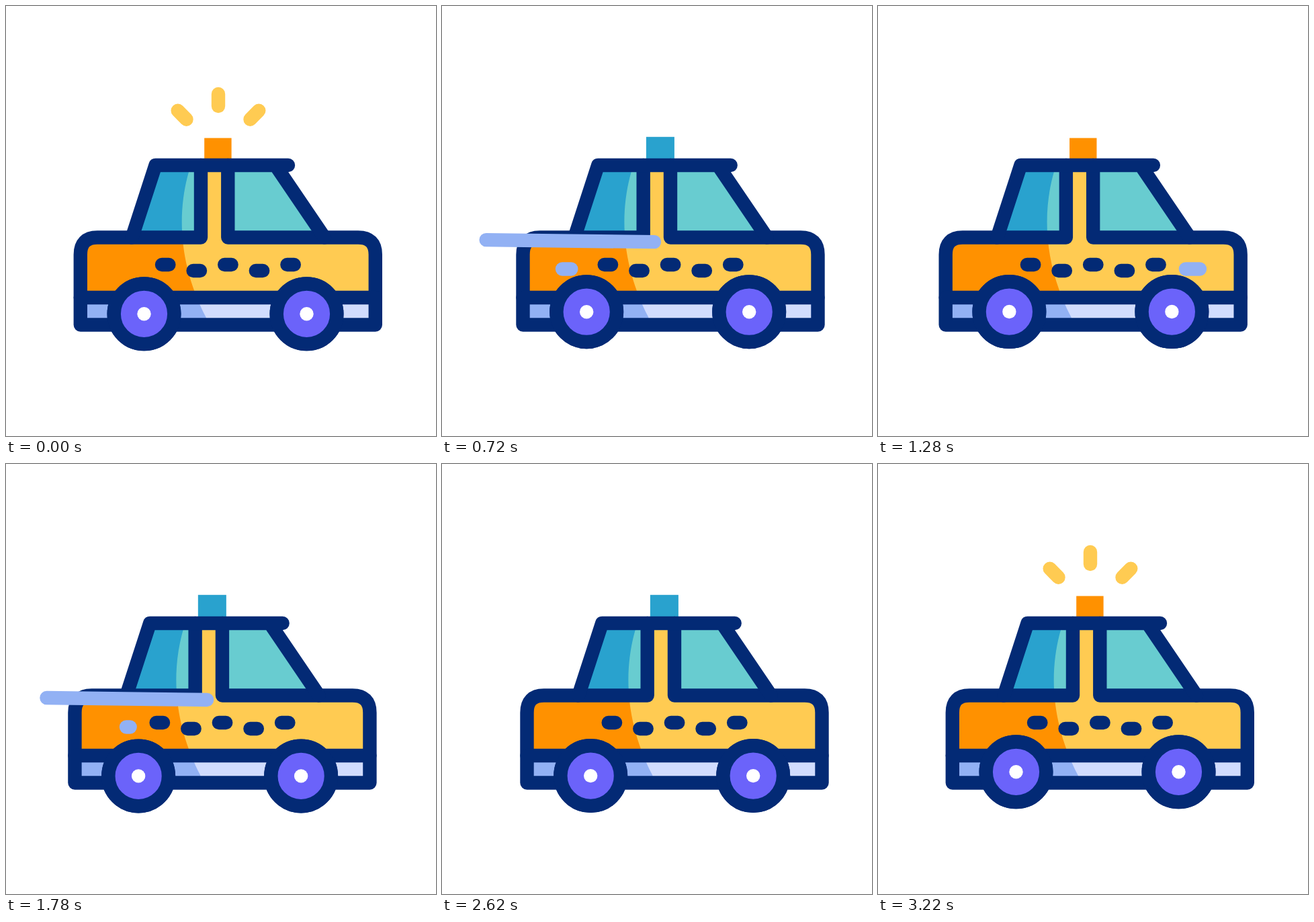
Write an HTML page that moves like this. It is 640 px wide and 640 px high and loops after 3340 ms.

```html
<!DOCTYPE html>
<html>
<head>
<meta charset="utf-8">
<style>
html, body { margin: 0; width: 100%; height: 100%; overflow: hidden; background: #fff; }
svg { display: block; width: 100vmin; height: 100vmin; }
.ink { fill: none; stroke: #032a75; }
.ray { stroke: #ffcb52; }
.wind { stroke: #92b1f4; }
.ink, .ray, .wind { stroke-width: 20.4; stroke-linecap: round; stroke-linejoin: round; }
</style>
</head>
<body>
<svg viewBox="0 0 640 640">
  <defs>
    <clipPath id="shade"><path d="M0 237H275C254.5 300 254.5 380 298 464V490H0Z"/></clipPath>
    <path id="body" d="M110.8 434V370Q110.8 344.5 136 344.5H524Q549.8 344.5 549.8 370V434Z"/>
    <path id="glass" d="M187.5 344.5L222.5 237H290V344.5Z"/>
    <path id="bumper" d="M110.8 434H549.8V474.5H110.8Z"/>
    <g id="wheel">
      <circle r="44.8" fill="#6b63fa" class="ink"/>
      <circle r="44.8" fill="#6b63fa" stroke="#032a75" stroke-width="20.4"/>
      <circle r="10.2" fill="#fff"/>
    </g>
  </defs>
  <g id="car">
    <g id="rays"></g>
    <rect id="lamp"/>
    <path d="M290 237H330V360H290Z" fill="#ffcb52"/>
    <use href="#glass" fill="#68ccd0"/>
    <path d="M330.3 344.5V237H401L474 344.5Z" fill="#68ccd0"/>
    <use href="#body" fill="#ffcb52"/>
    <use href="#bumper" fill="#d1dcfe"/>
    <g clip-path="url(#shade)">
      <use href="#glass" fill="#29a2ce"/>
      <use href="#body" fill="#ff9100"/>
      <use href="#bumper" fill="#92b1f4"/>
    </g>
    <g class="ink">
      <path d="M110.8 434V370Q110.8 344.5 136 344.5H290V237M330.3 237V344.5H524Q549.8 344.5 549.8 370V434"/>
      <path d="M187.5 344.5L222.5 237H420M401 237L474 344.5"/>
      <use href="#bumper"/>
      <path id="dashes"/>
    </g>
    <g id="wheels">
      <use href="#wheel" x="205.5"/>
      <use href="#wheel" x="447.5"/>
    </g>
  </g>
  <line class="wind" id="upper"/>
  <line class="wind" id="lower"/>
</svg>
<script>
const LOOP = 3340, START = 200, END = 3220, GUST = 1040;
const $ = id => document.getElementById(id);
const set = (el, attrs) => { for (const k in attrs) el.setAttribute(k, attrs[k]); };
const mix = (a, b, u) => a + (b - a) * u;
// eased progress of t through the span a..b
const ease = (t, a, b) => (1 - Math.cos(Math.PI * Math.min(1, Math.max(0, (t - a) / (b - a))))) / 2;

// sideways drift of the car: time, offset
const drift = [[200, 0], [480, 10.6], [620, 11.3], [720, 9.7], [1280, -10.1], [1530, -14.3],
  [1780, -8.4], [2100, 5.4], [2340, 15.2], [2480, 17.8], [2620, 15.7], [2880, 7.2], [3220, 0]];

function slope(i) {
  if (i == 0 || i == drift.length - 1) return 0;
  const [[a, p], [b, q], [c, r]] = drift.slice(i - 1, i + 2);
  return ((q - p) / (b - a) * (c - b) + (r - q) / (c - b) * (b - a)) / (c - a);
}

function carX(t) {
  if (t <= START || t >= END) return 0;
  const i = drift.findIndex(p => p[0] > t) - 1;
  const [a, p] = drift[i], [b, q] = drift[i + 1];
  const h = b - a, u = (t - a) / h, v = 1 - u;
  return v * v * (1 + 2 * u) * p + u * u * (3 - 2 * u) * q
    + h * u * v * (v * slope(i) - u * slope(i + 1));
}

function wheelY(t) {
  const rest = 458.3, top = 454.6;
  if (t < 300) return mix(rest, top, ease(t, START, 300));
  if (t > 2900) return mix(top, rest, ease(t, 2900, 3120));
  return top + 11 * ((1 + Math.cos(t * Math.PI / 100)) / 2) ** 1.3;
}

// shows the part of the segment x1,y1 - x2,y2 between two progress values
function trim(el, [x1, y1, x2, y2], from, to) {
  set(el, {
    x1: mix(x1, x2, from), y1: mix(y1, y2, from),
    x2: mix(x1, x2, to), y2: mix(y1, y2, to),
    visibility: to > 0 && from < 1 ? 'visible' : 'hidden'
  });
}

const rays = [[255.7, 155.7, 268.5, 168.7], [316, 131, 316, 149], [376.3, 155.7, 363.5, 168.7]].map(seg => {
  const el = document.createElementNS('http://www.w3.org/2000/svg', 'line');
  el.setAttribute('class', 'ray');
  $('rays').append(el);
  return [el, seg];
});

let dashes = '';
for (let i = 0; i < 5; i++) dashes += `M${232 + 46.6 * i} ${i % 2 ? 394 : 385}h10.4`;
set($('dashes'), { d: dashes });

function draw(t) {
  set($('car'), { transform: `translate(${carX(t)})` });
  set($('wheels'), { transform: `translate(0 ${wheelY(t)})` });

  const beat = (t - START + 1000) % 1000;
  const blue = t > START && t < END && beat >= 250 && beat < 750;
  set($('lamp'), blue
    ? { x: 294.2, y: 194.8, width: 42, height: 42, fill: '#29a2ce' }
    : { x: 295.2, y: 196.5, width: 40.4, height: 40, fill: '#ff9100' });

  const hide = ease(t, START, 380) - ease(t, 3000, END);
  for (const [el, seg] of rays) trim(el, seg, hide, 1);

  const g = t < START + GUST ? t : t < START + 2 * GUST ? t - GUST : 0;
  trim($('upper'), [367, 351.8, 57, 348], ease(g, 600, 1055), ease(g, 270, 775));
  trim($('lower'), [479, 391.5, 179, 391.5], ease(g, 356, 778), ease(g, 200, 440));
}

const begin = performance.now();
(function tick() {
  draw((performance.now() - begin) % LOOP);
  requestAnimationFrame(tick);
})();
</script>
</body>
</html>
```
